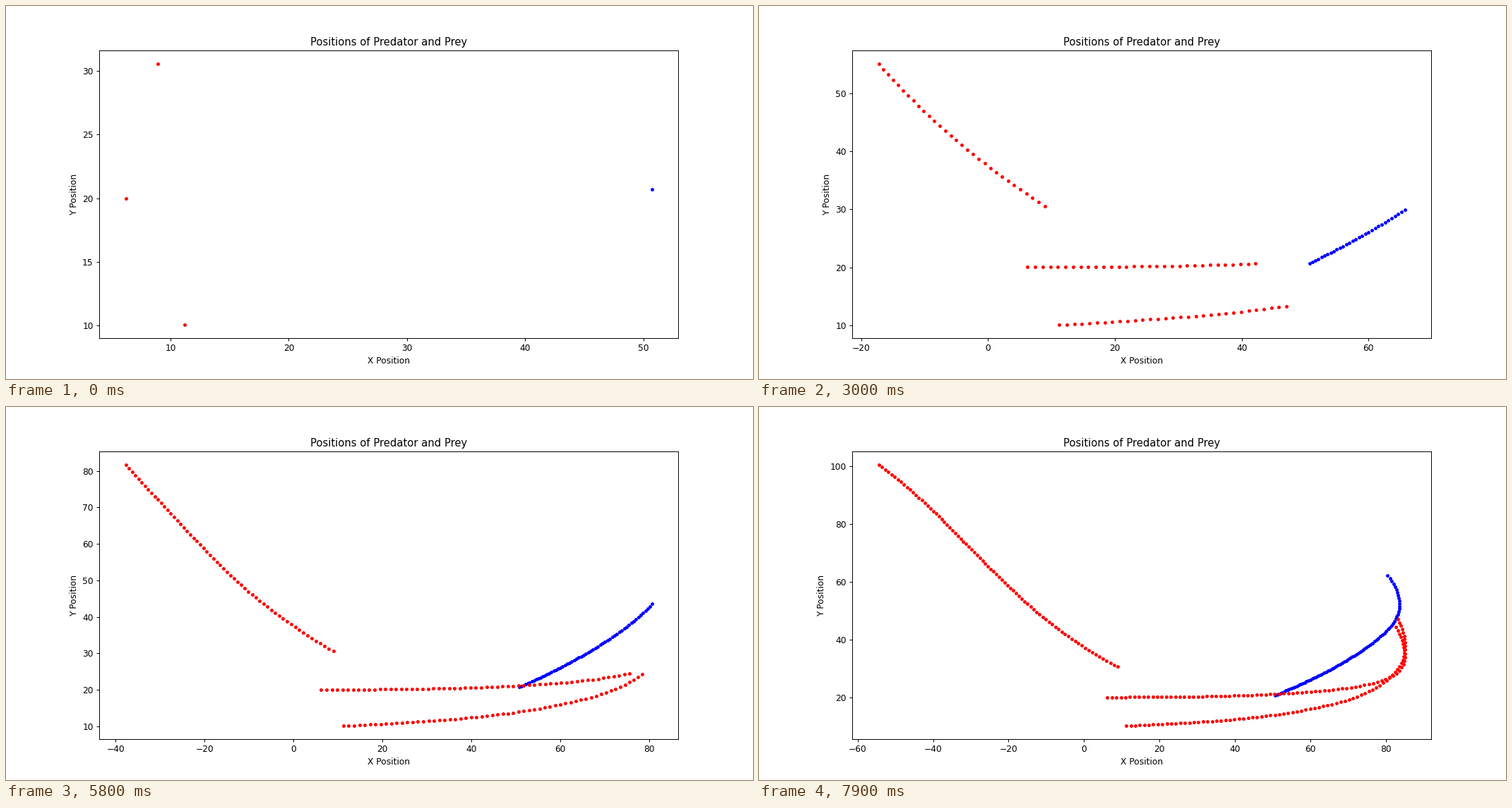
Recreate the animation shown at these times as a matplotlib script. Size 1058 px wide and 529 px high, loop 8000 ms.

```python
import numpy as np
import matplotlib.pyplot as plt
from matplotlib.animation import FuncAnimation

STEPS = 80
TURNS = [0, 16, 30, 46, 56, 63, 70, 79]  # steps at which headings are keyed


def path(start, headings, speed):
    """Walk from start; the heading (degrees) eases between its key values."""
    t = np.arange(1, STEPS) - 0.5
    angle = np.radians(np.interp(t, TURNS, headings))
    moves = speed(t) * np.array([np.cos(angle), np.sin(angle)])
    return np.array(start)[:, None] + np.insert(moves.cumsum(axis=1), 0, 0, axis=1)


def cruise(t):
    return 1.2


def flee(t):
    return 0.525 + 0.0042 * t + 0.28 * (t / 79) ** 6


TRACKS = [
    ("b.", path((50.72, 20.70), [28, 31.3, 35.2, 42, 50, 67, 95, 123], flee)),
    ("r.", path((8.94, 30.56), [145, 136.3, 128.9, 127.1, 127, 129, 131.6, 136.5], cruise)),
    ("r.", path((6.21, 20.01), [0.1, 0.8, 2.4, 5.8, 12.5, 29, 90, 115], cruise)),
    ("r.", path((11.21, 10.06), [3.3, 4.6, 8.6, 17, 34, 56, 87, 113], cruise)),
]

fig, ax = plt.subplots(figsize=(12, 6), dpi=1058 / 12)
ax.set_title("Positions of Predator and Prey")
ax.set_xlabel("X Position")
ax.set_ylabel("Y Position")
trails = [ax.plot([], [], style)[0] for style, _ in TRACKS]


def draw(step):
    for trail, (_, track) in zip(trails, TRACKS):
        trail.set_data(*track[:, :step + 1])
    ax.relim()
    ax.autoscale_view()
    return trails


anim = FuncAnimation(fig, draw, frames=STEPS, interval=100,
                     init_func=lambda: draw(0), repeat=True, repeat_delay=0)
plt.show()
```
